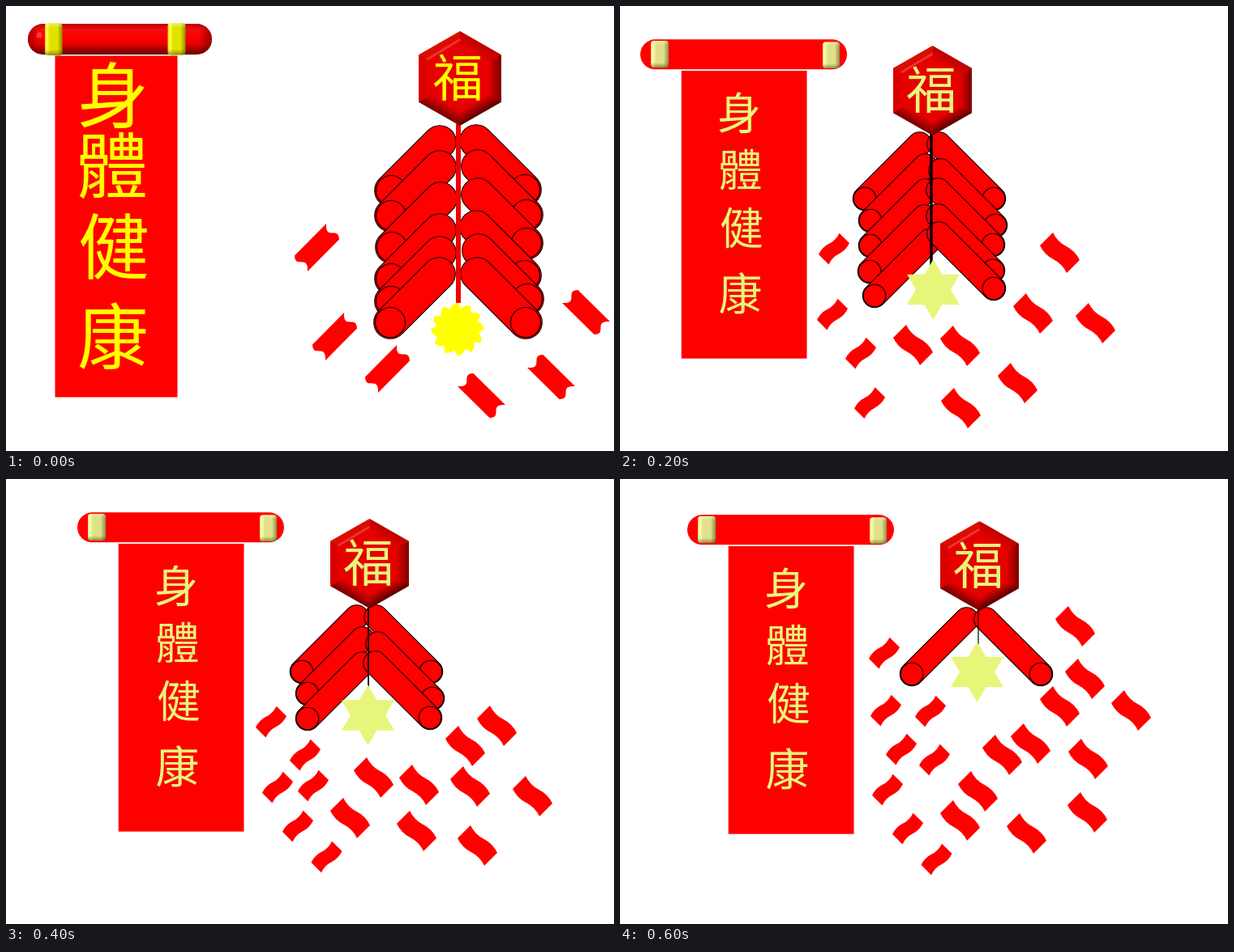
An HTML page with a canvas that plays this animation: 750 by 550 pixels, repeating every 700 ms.

```html
<!DOCTYPE html>
<html lang="zh-Hant">
<head>
<meta charset="utf-8">
<title>Firecrackers</title>
<style>
  html, body { margin: 0; overflow: hidden; background: #fff; }
  canvas { display: block; }
</style>
</head>
<body>
<canvas id="stage" width="750" height="550"></canvas>
<script>
const ctx = document.getElementById('stage').getContext('2d');
const RED = '#f00', PALE = '#e8f57b', YELLOW = '#ff0';

// Poses of the swaying scene: shift, crackers left per side, rope width, star centre.
const poses = [
  { dx: 0, dy: 0, rows: 6, rope: 5, star: [385.5, 390.5] },
  { dx: 0, dy: 0, rows: 5, rope: 3.5, star: [386.5, 350.5] },
  { dx: 11, dy: 2, rows: 4, rope: 2.5, star: [385.5, 325] },
  { dx: 63, dy: 0, rows: 3, rope: 1.7, star: [383.5, 292] },
  { dx: 32, dy: 2, rows: 2, rope: 1.5, star: [383.5, 266] },
  { dx: 58, dy: 3, rows: 1, rope: 1.2, star: [382.5, 235.5] }
];

// Lower ends of the crackers, top row first.
const swayLeft = [[302, 238], [309, 265], [309, 296], [308, 328], [314, 358], [323, 379]];
const swayRight = [[461, 238], [463, 271], [460, 295], [460, 327], [461, 349], [462, 384]];
const restLeft = [[475, 228], [475, 259], [476, 298], [475, 337], [475, 365], [474, 391]];
const restRight = [[640, 227], [642, 258], [642, 293], [640, 333], [643, 362], [641, 391]];

// Paper scraps: first pose, last pose, then x, y pairs.
const bigScraps = [
  [1, 1, 537.5, 324, 561.5, 381, 527.5, 438, 460.5, 457, 408.5, 497, 333.5, 486],
  [2, 5, 542.5, 305, 509.5, 380, 586.5, 392],
  [2, 6, 361.5, 419],
  [2, 3, 419.5, 420, 490.5, 466, 420.5, 497],
  [3, 5, 446.5, 378],
  [4, 5, 503.5, 330, 390.5, 369, 518.5, 453],
  [4, 6, 443.5, 435],
  [5, 6, 448.5, 324],
  [6, 6, 503.5, 179, 515.5, 244, 484.5, 278, 572.5, 283, 413.5, 338, 519.5, 343, 383.5, 383, 518.5, 409]
];
const smallScraps = [
  [1, 5, 264, 300],
  [1, 2, 262, 381],
  [1, 1, 275, 479],
  [2, 6, 297, 429],
  [2, 3, 308, 490.5],
  [3, 6, 272, 381],
  [3, 5, 316, 379],
  [4, 5, 306, 341],
  [4, 6, 332.5, 467],
  [5, 5, 353, 323],
  [6, 6, 268, 212, 270, 283, 325, 284, 289, 331, 330, 344]
];

const wave = new Path2D('M-8.5-25Q-3-13.5 8-8Q19-2.5 24.5 9L8.5 25Q3 13.5-8 8Q-19 2.5-24.5-9Z');
const shred = new Path2D('M11.5-29.5C10-8 27-27 27.5-10L-11.5 29.5C-10 8-27 27-27.5 10Z');

function rect(x, y, w, h, color) {
  ctx.fillStyle = color;
  ctx.fillRect(x, y, w, h);
}

function roundRect(x, y, w, h, r, fill) {
  ctx.beginPath();
  ctx.roundRect(x, y, w, h, r);
  ctx.fillStyle = fill;
  ctx.fill();
}

function ramp(x0, y0, x1, y1, ...stops) {
  const g = ctx.createLinearGradient(x0, y0, x1, y1);
  for (const [at, color] of stops) g.addColorStop(at, color);
  return g;
}

function polygon(points, fill) {
  ctx.beginPath();
  for (const [x, y] of points) ctx.lineTo(x, y);
  ctx.closePath();
  ctx.fillStyle = fill;
  ctx.fill();
}

function place(path, x, y, sx = 1, sy = 1, turn = 0) {
  ctx.save();
  ctx.translate(x, y);
  ctx.rotate(turn);
  ctx.scale(sx, sy);
  ctx.fillStyle = RED;
  ctx.fill(path);
  ctx.restore();
}

function glyph(char, x, y, size, color) {
  ctx.font = `${size}px "Noto Sans CJK TC", "Noto Sans CJK", sans-serif`;
  ctx.textAlign = 'center';
  ctx.fillStyle = color;
  ctx.fillText(char, x, y + size * 0.38);
}

function cap(x, y, w, h, light, base, dark) {
  roundRect(x, y, w, h, 4, ramp(x, 0, x + w, 0, [0, base], [0.12, light], [0.3, base], [0.72, base], [1, dark]));
  roundRect(x, y, w, h, 4, ramp(0, y, 0, y + h,
    [0, 'rgba(255,255,200,.5)'], [0.15, 'rgba(255,255,200,0)'], [0.82, 'rgba(60,60,0,0)'], [1, 'rgba(60,60,0,.5)']));
}

function hexagon(x, y, w, h) {
  const corners = [[0, -1], [1, -0.5], [1, 0.5], [0, 1], [-1, 0.5], [-1, -0.5]];
  const faces = [[190, 0], [125, 0], [90, 0], [120, 0], [215, 0], [215, 18]];
  const rings = 14;
  for (let k = 0; k <= rings; k++) {
    const scale = 1 - 0.3 * k / rings, blend = k / rings;
    faces.forEach(([r, g], i) => {
      const edge = [corners[i], corners[(i + 1) % 6]].map(([a, b]) => [x + a * w * scale, y + b * h * scale]);
      polygon([...edge, [x, y]], `rgb(${r + (230 - r) * blend},${g * (1 - blend)},0)`);
    });
  }
  polygon(corners.map(([a, b]) => [x + a * w * 0.7, y + b * h * 0.7]), '#e60000');
  ctx.beginPath();
  ctx.moveTo(x - w * 0.8, y - h * 0.4);
  ctx.lineTo(x, y - h * 0.82);
  ctx.lineWidth = 3;
  ctx.strokeStyle = '#f03030';
  ctx.stroke();
}

// Capsule from its lower end towards the rope, with a disc on the lower end.
function cracker([x, y], dx, dy, r, disc) {
  const a = Math.atan2(dy, dx);
  ctx.beginPath();
  ctx.arc(x, y, r, a + Math.PI / 2, a - Math.PI / 2);
  ctx.arc(x + dx, y + dy, r, a - Math.PI / 2, a + Math.PI / 2);
  ctx.closePath();
  ctx.fillStyle = RED;
  ctx.fill();
  ctx.strokeStyle = '#000';
  ctx.lineWidth = 1.1;
  ctx.stroke();
  ctx.beginPath();
  ctx.arc(x, y, disc, 0, 7);
  ctx.stroke();
}

function crackers(left, right, rows, reach, r, disc) {
  left.slice(0, rows).forEach(p => cracker(p, reach, -reach, r, disc));
  right.slice(0, rows).forEach(p => cracker(p, -reach, -reach, r, disc));
}

function star(x, y, r) {
  const points = [];
  for (let i = 0; i < 12; i++) {
    const a = i * Math.PI / 6, d = i % 2 ? r / Math.sqrt(3) : r;
    points.push([x + d * Math.sin(a), y - d * Math.cos(a)]);
  }
  polygon(points, PALE);
}

function burst(x, y, r, teeth) {
  const at = (a, d) => [x + d * Math.cos(a), y + d * Math.sin(a)];
  const step = 2 * Math.PI / teeth;
  ctx.beginPath();
  for (let i = 0; i < teeth; i++) {
    const a = i * step;
    ctx.lineTo(...at(a, r));
    ctx.quadraticCurveTo(...at(a + step * 0.1, r * 0.88), ...at(a + step * 0.3, r * 0.8));
    ctx.quadraticCurveTo(...at(a + step * 0.6, r * 0.98), ...at(a + step, r));
  }
  ctx.fillStyle = YELLOW;
  ctx.fill();
}

function drawRest() {
  roundRect(27, 22, 227, 38, 18.5, ramp(0, 22, 0, 60,
    [0, '#b80000'], [0.18, '#f01010'], [0.4, '#f00'], [0.65, '#e80000'], [1, '#600']));
  roundRect(27, 22, 227, 38, 18.5, ramp(27, 0, 254, 0,
    [0, 'rgba(90,0,0,.5)'], [0.06, 'rgba(90,0,0,0)'], [0.93, 'rgba(90,0,0,0)'], [1, 'rgba(90,0,0,.6)']));
  ctx.beginPath();
  ctx.arc(41, 36, 3.5, 0, 7);
  ctx.fillStyle = 'rgba(255,110,110,.5)';
  ctx.fill();
  cap(48, 21, 21.5, 40, '#ffff50', '#e2e200', '#8c8c00');
  cap(199.5, 21, 22, 39.5, '#ffff50', '#e2e200', '#8c8c00');
  rect(60.5, 61.5, 151, 422, RED);
  [['身', 132, 110], ['體', 131, 197], ['健', 133, 297], ['康', 132, 408]]
    .forEach(([c, x, y]) => glyph(c, x, y, 88, YELLOW));

  crackers(restLeft, restRight, 6, 60, 20.3, 18.5);
  rect(555, 146, 6, 221, '#f00000');
  hexagon(560, 89.5, 51, 58.5);
  glyph('福', 557.5, 88.5, 62, YELLOW);
  burst(557, 399.5, 33, 12);

  [[383.5, 298.5], [405.5, 408.5], [470.5, 448.5]].forEach(([x, y]) => place(shred, x, y));
  [[715.5, 378.5], [672.5, 458.5], [586.5, 481.5]].forEach(([x, y]) => place(shred, x, y, 1, 1, Math.PI / 2));
}

function scraps(groups, n, sx, sy) {
  for (const [first, last, ...xy] of groups) {
    if (n < first || n > last) continue;
    for (let i = 0; i < xy.length; i += 2) place(wave, xy[i], xy[i + 1], sx, sy);
  }
}

function drawSway(n) {
  const { dx, dy, rows, rope, star: [sx, sy] } = poses[n - 1];
  ctx.save();
  ctx.translate(dx, dy);
  roundRect(25, 41.3, 255, 37, 18.5, RED);
  cap(38, 43, 22, 33, '#fbffb0', '#dfe088', '#8c8c50');
  cap(250, 44.5, 21, 32.5, '#fbffb0', '#dfe088', '#8c8c50');
  rect(75.7, 80, 154.8, 355.7, RED);
  [['身', 147, 132], ['體', 148.5, 202], ['健', 150, 274.5], ['康', 148.5, 355]]
    .forEach(([c, x, y]) => glyph(c, x, y, 54, PALE));

  crackers(swayLeft, swayRight, rows, 67.5, 14.7, 13.8);
  rect(384 - rope / 2, 158, rope, sy - 188, '#000');
  hexagon(385.5, 104.5, 48.5, 55.5);
  glyph('福', 384, 103.5, 62, PALE);
  star(sx, sy, 37.5);

  scraps(bigScraps, n, 1, 1);
  scraps(smallScraps, n, -0.775, 0.775);
  ctx.restore();
}

const start = performance.now();
function tick() {
  const n = Math.floor((performance.now() - start) % 700 / 100);
  rect(0, 0, 750, 550, '#fff');
  if (n === 0) drawRest();
  else drawSway(n);
  requestAnimationFrame(tick);
}
tick();
</script>
</body>
</html>
```
